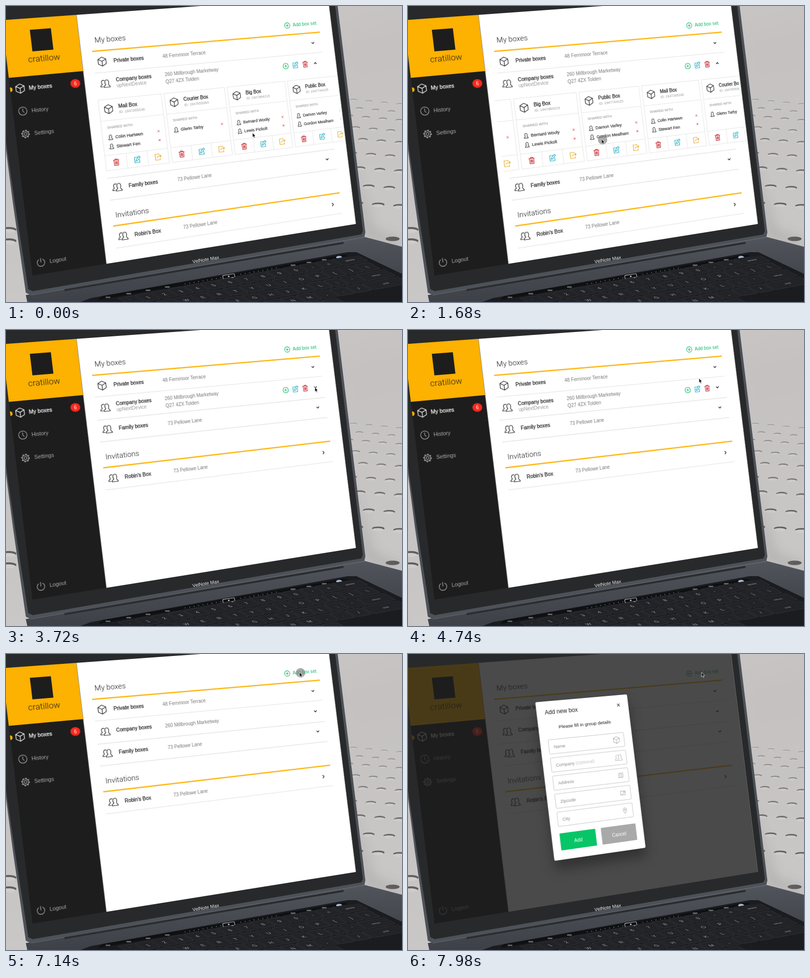
Recreate the animation shown at these times as an HTML page. Size 800 px wide and 600 px high, loop 8 s.

```html
<!DOCTYPE html>
<html lang="en">
<head>
<meta charset="utf-8">
<title>Box manager</title>
<style>
  html, body { margin: 0; width: 100%; height: 100%; overflow: hidden; background: #c6c4c3; }
  svg { position: absolute; left: 0; top: 0; font-family: "Liberation Sans", Arial, sans-serif; }
  .thin { font-family: Roboto, Inter, sans-serif; font-weight: 300; }
  .medium { stroke: currentColor; stroke-width: .25; }
  /* Perspective of the laptop screen; (0,0) is the left end of the first heading rule. */
  #ui { transform-origin: 0 0;
    transform: matrix3d(1.03006,-.0688,0,.0001736, .1189,.99508,0,-.00000495, 0,0,1,0, 174,92,0,1) translate(-170px,-80px); }
</style>
</head>
<body>
<svg id="scene" width="800" height="600" viewBox="0 0 800 600"></svg>
<svg id="ui" width="704" height="512" viewBox="-170 -80 704 512"></svg>
<svg id="top" width="800" height="600" viewBox="0 0 800 600">
  <g id="cursor">
    <circle id="press" cx="2" cy="1" r="9.5" fill="#777" fill-opacity=".62"/>
    <path d="M0 0V9.2L2 7.4L3.5 10.6L5 9.9L3.6 6.8L6.2 6.5Z" fill="#111" stroke="#fff" stroke-width=".7"/>
  </g>
</svg>
<script>
const $ = id => document.getElementById(id);
const INK = '#1d1d1d', AMBER = '#fdb100', RED = '#c4262e', TEAL = '#12a4ba', GOLD = '#e3a51a', GREEN = '#10b866';

// ---------- drawing helpers ----------
const rect = (x, y, w, h, fill, extra = '') => `<rect x="${x}" y="${y}" width="${w}" height="${h}" fill="${fill}" ${extra}/>`;
const group = (x, y, body, extra = '') => `<g transform="translate(${x} ${y})" ${extra}>${body}</g>`;
const line = (x1, y1, x2, y2, color = '#dedede', width = 1.1) =>
  `<path d="M${x1} ${y1}L${x2} ${y2}" stroke="${color}" stroke-width="${width}"/>`;
const poly = (points, fill, extra = '') => `<polygon points="${points}" fill="${fill}" ${extra}/>`;
// y is about the middle of the letters
const text = (x, y, s, size, color = INK, extra = '') =>
  `<text x="${x}" y="${y + size * .42}" font-size="${size}" fill="${color}" color="${color}" ${extra}>${s}</text>`;
const MEDIUM = 'class="medium"', THIN = 'class="thin"', MIDDLE = 'text-anchor="middle"';

const person = 'M-3 7.5C-4 4.5 1 3.6 1 1.8C-1.6-1-.8-7.5 3.6-7.5S8-1 6.3 1.8C6.3 3.6 10 4.5 9.5 7.5Z';
const ring = r => `M${-r} 0A${r} ${r} 0 1 1 ${r} 0A${r} ${r} 0 1 1 ${-r} 0`;
const shapes = {
  cube: 'M0-9L8-4.7V4.7L0 9.3L-8 4.7V-4.7ZM-8-4.7L0-.4L8-4.7M0-.4V9.3',
  people: person + 'M-4.5 6H-9.6C-10.3 2.5-5.6 2.8-6 .5C-8.4-2-7.4-7.2-3.6-7.2Q-2.2-7.2-1-6.2',
  person: person,
  down: 'M-3-1.5L0 1.6L3-1.5',
  right: 'M-1.5-3.4L1.6 0L-1.5 3.4',
  plus: ring(6) + 'M-3.2 0H3.2M0-3.2V3.2',
  edit: 'M2-5H-5V6H5V0M-2.4 3L-1.4-.6L4.8-6.8L7-4.6L.9 1.8Z',
  trash: 'M-6-4.3H6M-2.2-4.3V-6.4H2.2V-4.3M-4.6-4.3L-4 6.4H4L4.6-4.3M-1.8-2V4.3M0-2V4.3M1.8-2V4.3',
  share: 'M2.5-4V-6H-5.5V6H4.5V3M-2 2Q-1-1.5 3-1.5H6.5M4-4.3L6.8-1.5L4 1.3',
  cross: 'M-2-2L2 2M2-2L-2 2',
  clock: ring(8) + 'M0-5V0L2.5 3.4',
  gear: ring(2.8) + ring(6),
  power: 'M-3.5-6A7.3 7.3 0 1 0 3.5-6M0-8.5V0',
  map: 'M-6-5L-2-6.5L2-5L6-6.5V5L2 6.5L-2 5L-6 6.5ZM-2-6.5V5M2-5V6.5',
  letter: 'M-6.5-5H6.5V5H-6.5ZM2-3H4.5V-.5H2ZM-4 2.5H1',
  pin: 'M0 7.5C-3 3-5-.5-5-2.5A5 5 0 0 1 5-2.5C5-.5 3 3 0 7.5' + 'M-2-2.5A2 2 0 1 1 2-2.5A2 2 0 1 1-2-2.5'
};
const icon = (name, x, y, color = INK, scale = 1, width = 1.2) =>
  `<path transform="translate(${x} ${y}) scale(${scale})" d="${shapes[name]}" fill="none" stroke="${color}" stroke-width="${width / scale}" stroke-linejoin="round"/>`;

// ---------- desk and laptop ----------
// A drilled hole: a dark crescent over the lit lower wall.
const hole = (x, y, rx, ry) => `<ellipse cx="${x}" cy="${y}" rx="${rx}" ry="${ry}" fill="#625f5f"/>` +
  `<ellipse cx="${x - rx * .08}" cy="${y + ry * .6}" rx="${rx * .95}" ry="${ry * .8}" fill="#cfcdcc"/>`;

function drawScene() {
  let holes = '';
  for (let r = 0; r < 9; r++) for (let k = -1; k < 4; k++) {
    const pitch = 31 + r * 1.5;
    holes += `<g opacity="${.4 + r * .075}">${hole(795 - (k + (r % 2) / 2) * pitch, 199 + r * 13 + r * r * 1.6 - k * 3, 7 + r * .7, 2 + r * .25)}</g>`;
  }
  holes += '<ellipse cx="781" cy="472" rx="14" ry="4.5" fill="#565354"/>' + hole(6, 453, 15, 5) + hole(6, 476, 15, 5);

  let keys = '';
  const key = (col, row, label, wide = 1) => {
    const x = col * 20, y = row * 20;
    keys += rect(x - 9, y - 8.5, wide * 20 - 2, 17, '#222327', 'rx="2" stroke="#3a3c41" stroke-width=".6"');
    keys += text(x + wide * 10 - 10, y, label, label.length > 1 ? 4 : 6.5, '#a6a8ae', MIDDLE);
  };
  [['`1234567890-=', -1], ['QWERTYUIOP[]\\', .5], ["ASDFGHJKL;'", .8], ['ZXCVBNM,./', 1.3], ['      ', 3]]
    .forEach(([row, start], r) => [...row].forEach((c, i) => key(start + i, r, c)));
  key(12, 0, 'delete', 1.6);
  key(11.8, 2, 'return', 1.8);
  key(11.3, 3, 'shift', 2.3);

  let bar = '';
  for (let i = 0; i < 9; i++) for (const x of [362, 474]) {
    const px = x + i * 9;
    bar += `<circle cx="${px}" cy="${548 - (px - 450) * .174}" r=".8" fill="#a0a2a8"/>`;
  }
  for (const x of [206, 248, 287, 326, 580, 612, 643])
    bar += group(x, 548 - (x - 450) * .174, rect(-5, -1.3, 10, 2.6, '#a5a8ae', 'rx="1.3"'), 'opacity=".6"');
  bar += group(450, 548, rect(-12, -3.6, 24, 7.2, 'none', 'rx="2" stroke="#d8dade" transform="rotate(-9)"') + '<circle r="1.6" fill="#d8dade"/>');
  bar += '<ellipse cx="673" cy="509.5" rx="6" ry="3" fill="#a9bdd6"/>';

  $('scene').innerHTML = `<defs>
    <linearGradient id="desk" x2=".25" y2="1"><stop stop-color="#cccac9"/><stop offset=".35" stop-color="#c4c1c0"/><stop offset="1" stop-color="#cac8c7"/></linearGradient>
    <linearGradient id="base" x2=".2" y2="1"><stop stop-color="#555960"/><stop offset="1" stop-color="#3d4046"/></linearGradient>
    <filter id="soft"><feGaussianBlur stdDeviation="12"/></filter>
    <filter id="focus"><feGaussianBlur stdDeviation=".6"/></filter>
    <clipPath id="well"><polygon points="140,600 185,594 688,508 712,506 800,549 800,600"/></clipPath></defs>
    ${rect(0, 0, 800, 600, 'url(#desk)')}
    <g filter="url(#focus)">${holes}</g>
    ${poly('690,300 728,470 800,490 800,476 742,455', '#8d8b8c', 'filter="url(#soft)" opacity=".45"')}
    ${poly('40,586 724,468 800,488 800,600 43,600', 'url(#base)')}
    ${poly('0,0 670,0 726,459 724,468 50,586 40,581 14,400 0,292', '#4d5158')}
    ${poly('0,0 665,0 721,456 718,463 54,578 45,574 18,400 0,275', '#28292b')}
    ${line(50, 586, 724, 469, '#646870', 1.2)}
    ${line(118, 576, 682, 480, '#2b2d31', 4)}
    ${poly('150,600 172,592 690,499 708,499 800,543 800,600', '#1b1c1f')}
    ${poly('186,596 194,588 684,504 694,508', '#0f1012')}
    ${bar}
    <g clip-path="url(#well)"><g transform="matrix(1.66 -.305 1.4 .75 286 590)">${keys}</g></g>
    <g transform="translate(403.5 513) rotate(-9.6)">${text(0, 0, 'VelNote Max', 9.6, '#eee', MIDDLE)}</g>`;
}

// ---------- application ----------
const SHIFT = 167, PITCH = 136.8;
const row = (y, symbol, name, address, arrow = 'down') =>
  icon(symbol, 17.5, y) + text(41, y - .5, name, 10.3, INK, MEDIUM) + text(143, y, address, 10, '#777') + icon(arrow, 480.5, y, INK, 1, 1.5);

const boxes = [
  ['Mail Box', '1947265246', 'Colin Hartwen', 'Stewart Fen'],
  ['Courier Box', '1947655384', 'Glenn Tarby'],
  ['Big Box', '1947884219', 'Bernard Wooly', 'Lewis Pickolt'],
  ['Public Box', '1947744125', 'Damon Varley', 'Gordon Mealham']
];
function card(i) {
  const [name, id, ...people] = boxes[i % boxes.length];
  return group(i * PITCH, 99.5,
    rect(0, 0, 130.5, 143.5, '#fff', 'stroke="#e2e2e2"') +
    line(0, 43, 130.5, 43, '#e4e4e4', 1) + line(0, 113, 130.5, 113, '#e4e4e4', 1) +
    line(43.5, 113, 43.5, 143.5, '#e4e4e4', 1) + line(87, 113, 87, 143.5, '#e4e4e4', 1) +
    icon('cube', 19, 20) + text(39.5, 15, name, 10.1, INK, MEDIUM) + text(39.5, 27, 'ID: ' + id, 7.5, '#999') +
    text(11.5, 56.5, 'SHARED WITH', 7.5, '#888') +
    people.map((p, k) => {
      const y = 77 + k * 18.5;
      return icon('person', 14, y, INK, .65, 1) + text(26, y, p, 9.1, INK, 'class="medium" style="stroke-width:.12"') + icon('cross', 115.7, y - 1, RED, 1, 1);
    }).join('') +
    icon('trash', 21.8, 128.5, RED) + icon('edit', 64.5, 128.5, TEAL) + icon('share', 108, 128.5, GOLD));
}

const sideItem = (y, symbol, label, color = '#a9a9a9') =>
  icon(symbol, -149, y, color) + text(-132.3, y, label, 10.6, color, color === '#fff' ? MEDIUM : '');

const field = ([label, symbol, note = ''], i) => group(17, 79.5 + i * 37.4,
  rect(0, 0, 162, 29.5, '#fff', 'rx="1.5" stroke="#c4c4c4"') +
  text(10, 15, `${label} <tspan fill="#c2c2c2">${note}</tspan>`, 9.2, '#8a8a8a') + icon(symbol, 145, 14.5, '#a8a8a8', .8, .9));

function drawApp() {
  const sidebar = rect(-168, -76, 145.5, 504, INK) + rect(-168, -76, 145, 114, AMBER) +
    rect(-117, -53, 41, 43, INK) + text(-96, 3.5, 'cratillow', 17, INK, THIN + MIDDLE) +
    `<path d="M-168 57A4.5 4.5 0 0 1-168 66Z" fill="${AMBER}"/>` +
    sideItem(61, 'cube', 'My boxes', '#fff') +
    '<ellipse cx="-41" cy="61.3" rx="9.7" ry="8.8" fill="#f8281c"/>' + text(-41, 60.8, '6', 10, '#fff', MIDDLE) +
    sideItem(105.6, 'clock', 'History') + sideItem(151, 'gear', 'Settings') +
    `<circle cx="-149" cy="151" r="7.3" fill="none" stroke="#a9a9a9" stroke-width="1.8" stroke-dasharray="2.6 3.13"/>` +
    sideItem(405, 'power', 'Logout');

  const company = icon('people', 18.4, 67.5) +
    `<g id="companyText">${text(41, 66, 'Company boxes', 10.25, INK, MEDIUM)}</g><g id="companyStreet">${text(143, 66.5, '260 Millbrough Marketway', 10, '#777')}</g>` +
    `<g id="hover">${text(41, 73, 'upNextDevice', 10, '#999')}${text(143, 74.5, 'Q27 4ZX Tolden', 10, '#777')}
      ${icon('plus', 411, 67, GREEN)}${icon('edit', 433, 67, TEAL)}${icon('trash', 456.5, 67, RED)}</g>` +
    `<g id="arrow">${icon('down', 0, 0, INK, 1, 1.5)}</g>`;

  const lower = line(0, 91.4, 500, 91.4) + row(111.5, 'people', 'Family boxes', '73 Pellowe Lane') + line(0, 135.6, 500, 135.6) +
    text(7, 165.2, 'Invitations', 15.2, INK, THIN) + line(0, 188, 500, 188, AMBER, 2.6) +
    row(211, 'people', "Robin's Box", '73 Pellowe Lane', 'right') + line(0, 233, 500, 233);

  const fields = [['Name', 'cube'], ['Company', 'people', '(Optional)'], ['Address', 'map'], ['Zipcode', 'letter'], ['City', 'pin']];
  const dialog = rect(0, 0, 197, 327, '#fff', 'rx="3" style="filter:drop-shadow(0 18px 13px #0005)"') +
    text(17, 22, 'Add new box', 12.1) + icon('cross', 175.5, 21, '#333', 1.4) +
    text(98.5, 54, 'Please fill in group details', 9.9, INK, MIDDLE) + fields.map(field).join('') +
    rect(17, 273, 76, 35, '#08c567', 'rx="1.5"') + text(55, 290.5, 'Add', 10, '#fff', MIDDLE) +
    rect(105, 273, 76, 35, '#a9a9a9', 'rx="1.5"') + text(143, 290.5, 'Cancel', 10, '#fff', MIDDLE);

  $('ui').innerHTML = `<defs><clipPath id="reveal"><rect id="revealBox" x="-11" y="94" width="536"/></clipPath></defs>` +
    rect(-23, -76, 552.5, 504, '#fff') + sidebar +
    text(7.5, -23, 'My boxes', 15.2, INK, THIN) + icon('plus', 425.8, -20.3, GREEN) + text(438.6, -21.6, 'Add box set', 10.6, GREEN) +
    line(0, 0, 500, 0, AMBER, 2.6) + row(22.2, 'cube', 'Private boxes', '48 Fernmoor Terrace') + line(0, 44.2, 500, 44.2) + company +
    `<g clip-path="url(#reveal)"><g id="cards">${[0, 1, 2, 3, 4, 5, 6].map(card).join('')}</g></g><g id="lower">${lower}</g>` +
    `<g id="shade">${rect(-168, -76, 697.5, 504, INK)}</g><g id="dialog">${dialog}</g>`;
}

// ---------- motion ----------
const tracks = {
  cursor: [[200, 498, 257], [1120, 355, 273], [1480, 355, 273], [2150, 530, 258], [2450, 530, 258], [3150, 624, 116],
           [4100, 624, 116], [4850, 586, 97], [5760, 584, 94], [6700, 593, 37]],
  scroll: [[200, 0], [1320, -2 * PITCH], [1500, -2 * PITCH], [2380, 0]],
  press: [[200, 0], [300, 1], [900, 1], [1020, 0], [1500, 0], [1600, 1], [2000, 1], [2120, 0],
          [3200, 0], [3280, 1], [3400, 1], [3520, 0], [7000, 0], [7080, 1], [7200, 1], [7350, 0]],
  open: [[3270, 1], [3680, 0]],
  hover: [[5800, 1], [6150, 0]],
  dialog: [[7320, 0], [7750, 1]]
};
function sample(track, t) {
  const n = track.findIndex(k => k[0] > t);
  if (n === 0) return track[0].slice(1);
  if (n < 0) return track[track.length - 1].slice(1);
  const a = track[n - 1], b = track[n];
  const p = (1 - Math.cos(Math.PI * (t - a[0]) / (b[0] - a[0]))) / 2;
  return a.slice(1).map((v, i) => v + (b[i + 1] - v) * p);
}
const set = (id, name, value) => $(id).setAttribute(name, value);
const move = (id, x, y, more = '') => set(id, 'transform', `translate(${x} ${y}) ${more}`);

function render(t) {
  const get = name => sample(tracks[name], t);
  const [open] = get('open'), [hover] = get('hover'), [shown] = get('dialog');
  move('cursor', ...get('cursor'));
  set('press', 'opacity', get('press')[0]);
  move('cards', get('scroll')[0], 0);
  set('revealBox', 'height', open * 152);
  move('lower', 0, open * SHIFT);
  move('arrow', 480.5, 67, `scale(1 ${1 - 2 * open})`);
  move('companyText', 0, -5 * hover);
  move('companyStreet', 0, -7 * hover);
  set('hover', 'opacity', hover);
  set('shade', 'opacity', shown * .8);
  set('dialog', 'opacity', shown);
  move('dialog', 82.7, 13 - 14 * (1 - shown));
}

drawScene();
drawApp();
const start = performance.now();
function tick() {
  render((performance.now() - start) % 8000);
  requestAnimationFrame(tick);
}
tick();
</script>
</body>
</html>
```
